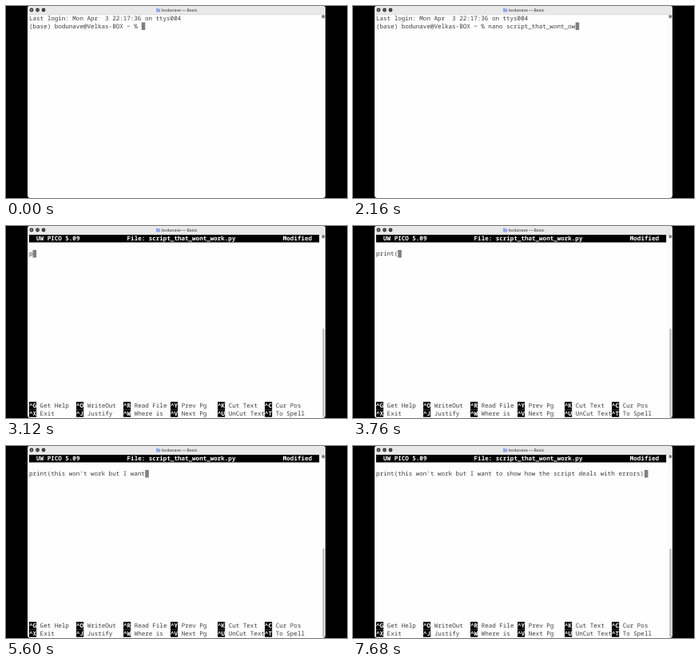
An HTML page for the animation above (8 s loop, 427 by 240 pixels).

```html
<!DOCTYPE html>
<html lang="en">
<head>
<meta charset="utf-8">
<title>Terminal</title>
<style>
  html, body { margin: 0; width: 100%; height: 100%; overflow: hidden; background: #000; }
  svg { display: block; width: 100vw; height: 100vh; }
  text { font: 7.567px "Noto Sans Mono", monospace; white-space: pre; fill: #3c3c3c; text-rendering: geometricPrecision; }
  .inverse { fill: #fff; font-weight: 700; }
  #title { font: 600 5px Inter, sans-serif; fill: #555; }
</style>
</head>
<body>
<svg viewBox="0 0 427 240">
  <rect x="27" width="373" height="240" rx="3.5" fill="#fefefe"/>
  <path d="M27 11V2.5Q27 0 29.5 0H397.5Q400 0 400 2.5V11Z" fill="#e9e9e9"/>
  <path d="M27 10.7H400" stroke="#d6d6d6" stroke-width=".6"/>
  <g fill="#333">
    <circle cx="32" cy="5" r="2.4"/>
    <circle cx="39.5" cy="5" r="2.4"/>
    <circle cx="47" cy="5" r="2.4"/>
  </g>
  <path d="M31 4L33 6M33 4L31 6M38.3 5H40.7M46.6 5.5L48 4.1" stroke="#bbb" stroke-width=".7"/>
  <path d="M188 2.8H190L190.6 3.5H193.2V7.6H188Z" fill="#8ea6ee"/>
  <text id="title" x="195" y="7">bodunave — Basic</text>
  <path d="M395 11V240" stroke="#eee" stroke-width=".5"/>
  <rect x="395.3" y="11.3" width="4.2" height="4" rx=".6" fill="#aaa"/>
  <path d="M396 12.5H399M396 14H399" stroke="#444" stroke-width=".7"/>
  <rect id="cursor" width="4.54" height="9.49" fill="#7f7f7f"/>
  <g id="shell"></g>
  <g id="editor">
    <rect x="396.3" y="128" width="3" height="111" rx="1.5" fill="#c2c2c2"/>
  </g>
</svg>
<script>
const $ = id => document.getElementById(id);
const CW = 4.54, RH = 9.49, STEP = 80, LOOP = 8000, OPEN = 2880;
const colX = col => 29 + col * CW;
const rowY = row => 11 + row * RH;

function add(parent, tag, attrs, content = '') {
  const el = document.createElementNS('http://www.w3.org/2000/svg', tag);
  for (const key in attrs) el.setAttribute(key, attrs[key]);
  el.textContent = content;
  return parent.appendChild(el);
}
const write = (parent, col, row, content, cls = '') =>
  add(parent, 'text', { x: colX(col), y: rowY(row) + 7.3, class: cls }, content);
const bar = (col, row, cols) =>
  add(editor, 'rect', { x: colX(col), y: rowY(row), width: cols * CW, height: RH });

const shell = $('shell'), editor = $('editor'), cursor = $('cursor');
const prompt = '(base) bodunave@Velkas-BOX ~ % ';
write(shell, 0, 0, 'Last login: Mon Apr  3 22:17:36 on ttys004');
const command = write(shell, 0, 1, prompt);

bar(0, 0, 80);
write(editor, 2, 0, 'UW PICO 5.09', 'inverse');
write(editor, 27, 0, 'File: script_that_wont_work.py', 'inverse');
const modified = write(editor, 70, 0, 'Modified', 'inverse');
const code = write(editor, 0, 2, '');
const menu = [
  ['G Get Help', 'O WriteOut', 'R Read File', 'Y Prev Pg', 'K Cut Text', 'C Cur Pos'],
  ['X Exit', 'J Justify', 'W Where is', 'V Next Pg', 'U UnCut Text', 'T To Spell']
];
menu.forEach((items, i) => items.forEach((item, j) => {
  bar(j * 13, 22 + i, 2);
  write(editor, j * 13, 22 + i, '^' + item[0], 'inverse');
  write(editor, j * 13 + 3, 22 + i, item.slice(2));
}));

// [time, characters typed]
const commandKeys = [[0, 0], [400, 5], [480, 5], [800, 8], [880, 8], [1760, 18],
  [2160, 24], [2320, 22], [2640, 28], [2720, 29]];
const codeKeys = [[2960, 0], [3040, 1], [3120, 1], [4560, 12], [5600, 32],
  [6160, 45], [6800, 59], [7680, 74]];
const script = "print(this won't work but I want to show how the script deals with errors)";

function typed(keys, t) {
  const i = keys.findIndex(k => k[0] > t);
  if (i < 0) return keys.at(-1)[1];
  if (i === 0) return keys[0][1];
  const [t0, n0] = keys[i - 1], [t1, n1] = keys[i];
  return Math.round(n0 + (n1 - n0) * (t - t0) / (t1 - t0));
}

function placeCursor(col, row) {
  cursor.setAttribute('x', colX(col));
  cursor.setAttribute('y', rowY(row));
}

function draw(now) {
  const t = Math.floor(now % LOOP / STEP) * STEP;
  const editing = t >= OPEN;
  shell.style.display = editing ? 'none' : '';
  editor.style.display = editing ? '' : 'none';
  if (editing) {
    const n = typed(codeKeys, t);
    code.textContent = script.slice(0, n);
    modified.style.display = n ? '' : 'none';
    placeCursor(n, 2);
  } else {
    const n = typed(commandKeys, t);
    const line = 'nano script_that_wont_' + (t < 2320 ? 'ow' : 'work.py');
    command.textContent = prompt + line.slice(0, n);
    placeCursor(prompt.length + n, 1);
  }
  requestAnimationFrame(draw);
}
draw(performance.now());
</script>
</body>
</html>
```
